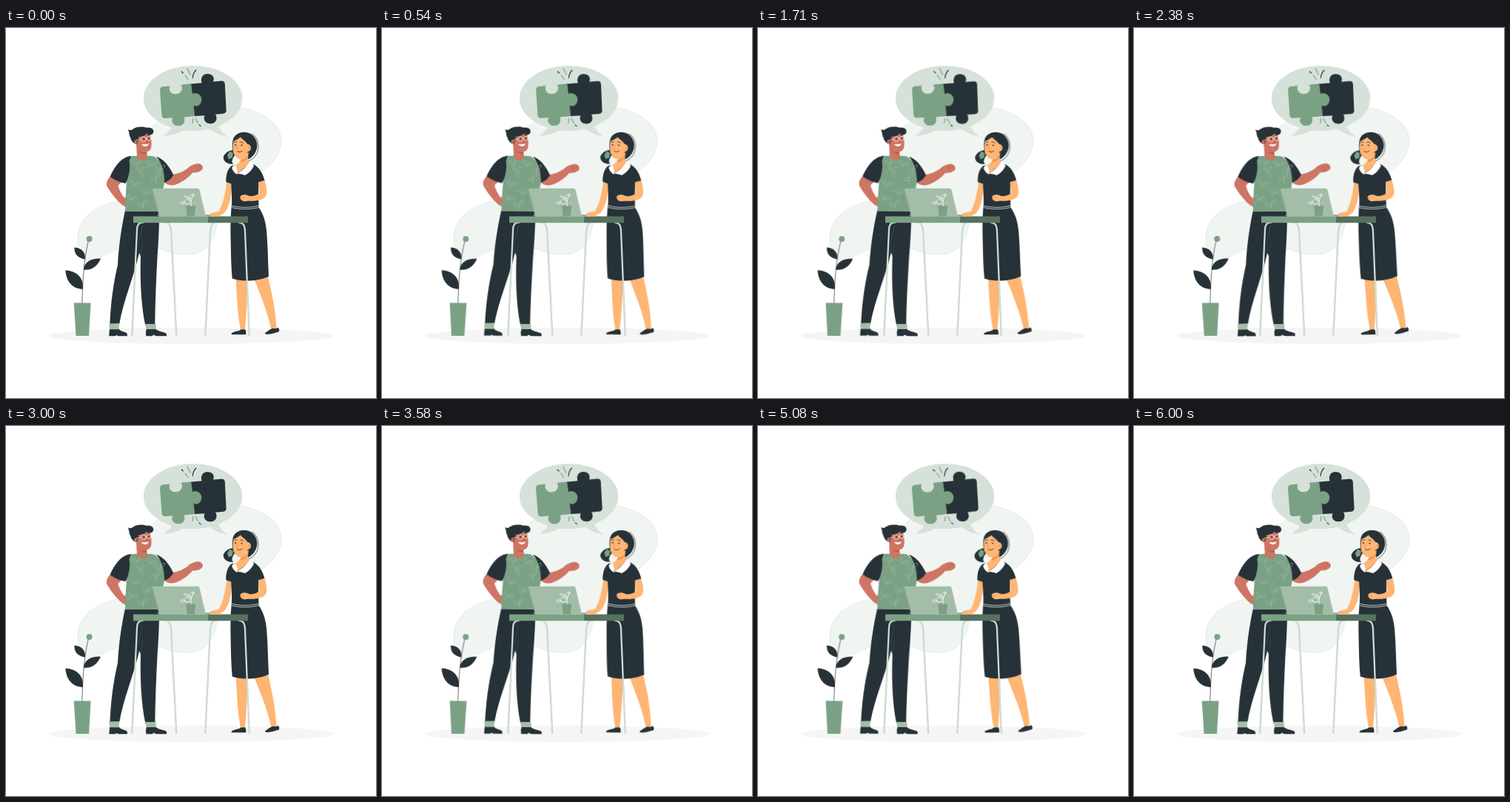
Recreate the animation shown at these times as an HTML page. Size 500 px wide and 500 px high, loop 6.04 s.

```html
<!DOCTYPE html>
<html lang="en">
<head>
<meta charset="utf-8">
<title>Team talk</title>
<style>
  html, body { margin: 0; width: 100%; height: 100%; overflow: hidden; background: #fff; }
  svg { display: block; width: 100vw; height: 100vh; }
  .ink { fill: #263238; }
  .green { fill: #7ba185; }
  .pale { fill: #a3bda9; }
  .man { fill: #ce7563; }
  .woman { fill: #ffb573; }
  .white { fill: #fff; }
  .line { fill: none; stroke-linecap: round; stroke-linejoin: round; }
  #puzzle { transform-origin: 252px 97px; }
  #plant { transform-origin: 104px 349px; }
  #he { transform-origin: 201px 275px; }
  #she { transform-origin: 322px 277px; }
</style>
</head>
<body>
<svg viewBox="0 0 500 500">
  <defs>
    <g id="sprig" class="line" stroke="#9dbaa5" stroke-width=".55">
      <path d="M0 11C1 7 2 4 5 0M2 6C-3 6-5 3-4 0C0 0 2 3 2 6ZM3 4C7 5 9 3 10 0C6-1 4 1 3 4Z"/>
    </g>
  </defs>

  <!-- backdrop -->
  <path fill="#f0f5f2" stroke="#ccd5cf" stroke-width=".4" d="M97 282C97 257 122 240 150 234C188 224 168 166 196 135C222 108 270 105 300 106C341 108 372 126 372 153C371 185 337 199 311 211C280 228 293 267 275 292C268 302 257 306 244 306C216 306 204 292 172 293C145 296 121 319 106 313C99 309 97 296 97 282Z"/>
  <ellipse cx="250" cy="416" rx="193" ry="11" fill="#f5f5f5"/>

  <!-- speech bubble -->
  <g fill="#d6e1d9">
    <ellipse cx="252.600" cy="95" rx="66.800" ry="44"/>
    <path d="M226 131C223 138 218 143 212 145.300C224 145.500 235 142 244 136Z"/>
    <path d="M274 135C281 141 290 145.500 300 147C293 143 288 137 286 129Z"/>
  </g>

  <g id="puzzle">
    <path class="ink" d="M250 75.500L264.500 74.300C262.500 67 266 62 272 62C279 62 282.500 67 280 72.500L291.500 71.500Q295.500 71.500 295.800 75.500L297.600 111Q297.800 115.300 293.500 115.800L283 116.800C286.500 122 284 129.300 276.500 129.300C269.500 129.300 266 124 268.500 118.200L255 119Z"/>
    <path class="green" d="M212 79.300L221.500 78.200C219 83 222 89.500 229.500 89.300C237 89 240 82 236.500 76.800L250 75.300L252 89C257 86 264.500 90 264.300 97C264 104 257.500 107.500 253.500 104.500L255 119L240.500 120.500C243 126 240 132.300 233 132.300C225.500 132.300 222.500 126 225.500 121.300L215 122Q211 122.300 210.500 118L208 84Q207.800 80 212 79.300Z"/>
    <path class="line" stroke="#4e6f59" stroke-width=".5" d="M250 75.500L252 89C257 86 264.500 90 264.300 97C264 104 257.500 107.500 253.500 104.500L255 119"/>
    <g class="line" stroke-width="1.200">
      <path stroke="#263238" d="M237.300 59L239.200 60.800M256.800 57C253.500 60 252.500 63 252.300 67.500M261.200 130.800L263 132.600"/>
      <path stroke="#7ba185" d="M242 64L246 69.500M245 55L249 63M253 122.500L252 128.500M256.300 122.500L259.500 128.500"/>
    </g>
  </g>

  <g id="plant">
    <path class="line" stroke="#263238" stroke-width=".7" d="M102.800 373C103.500 345 105 312 111.500 287"/>
    <circle class="green" cx="112.600" cy="285" r="4"/>
    <path class="ink" d="M106.800 312.500C97 311 92 305 92.500 296.500C102 297 108 303 106.800 312.500ZM104.800 326.500C106 316 115 311 128 311.500C124 322 115 328 104.800 326.500ZM104 352.800C90 352.500 81.500 343 80.300 327.500C95 328 105.500 337 104 352.800Z"/>
    <path class="green" d="M91.700 371.600H114.600L112 416H94.500Z"/>
  </g>

  <g id="he">
    <path class="ink" d="M140 406.500H152.500C155 411 163 410 163.800 413.500V416.300H152L149 415L148 416.300H139.200ZM190 406.500H202C206 411 216 410.500 217 413.500V416.300H203L199 414.500L198 416.300H189.300L188.800 411Z"/>
    <path class="ink" d="M161 246.500H207.300C207 270 206 290 204.500 310C203 340 201.500 372 201.300 402L188.300 402C182.500 375 181 340 182 308L180 304C173 336 158.500 368 153 401L140.300 401C141.500 372 145 345 151 320C152.500 293 156 270 161 246.500Z"/>
    <path class="line" stroke="#47545a" stroke-width=".5" d="M184 268C182 280 179 290 179.500 304M182 308L185 288"/>
    <path class="pale" d="M139.200 399.500L153.300 399L152.300 407.300H140ZM188 400H202.500L202.800 407H189.500Z"/>

    <path class="man" d="M143 198C138 203 134.500 209 136.500 214C143 225 152 236 159.500 240.800C166 242.300 172 240 170.800 234C168 229 163 229 160 229.500C155.500 224 152.500 217 151.500 213L158 206Z"/>
    <path class="man" d="M212 206C215 211 221 213.500 228 212C239 208 247 202 252 195.500C257 195.500 264.500 194.500 266 189.500C266.300 184 260.500 181.800 255 184C250 185.500 247 187.500 244.500 190.500C239 194 232 197.500 224 198Z"/>
    <path class="line" stroke="#a8543f" stroke-width=".6" d="M256 186L258 191M261 184.500L262 188"/>
    <path class="green" d="M166 174C173 172 190 172 200 173.500C208 178 214 188 214.500 206L212.500 217L206.800 248H161C161 235 162 222 163 208L165 190Z"/>
    <path class="ink" d="M169 173C156 174 146 188 140.800 201C147 206 154 208.500 161.500 210C166.500 202 168.500 187 166.500 180ZM203 173.800C212 176 221 187 226.300 198.500C223 204.500 218.500 207.500 214 209C214.500 196 211 183 203 173.800Z"/>
    <g id="print"></g>

    <path class="man" d="M176 156L177 173C180 181 190 181 191 173.500L189.500 165Z"/>
    <path fill="#b45e4a" d="M180 166C184 169 188 168.500 190 167.500L190.300 170C186 171.500 182 169 180 166Z"/>
    <path class="man" d="M176 147L194 142.500C196.500 148 197.300 157 196 162.500C193.500 169 186 168.500 180.500 165C176 161 175 154 176 147Z"/>
    <path class="ink" d="M164.800 137C167 139 170 138 172.500 136C178 133 185 133 190 134.800C196 133 201 137.500 199 141.500C198 145 193.500 145 190 143C187 146.500 182 147 179.500 147L178.800 154C176 151 174.500 153 176 157C172 156 169 152 168.500 149C167.500 147 166.500 145 166.500 142.500C166.300 141 165.500 139 164.800 137Z"/>
    <circle class="man" cx="176" cy="154" r="2.700"/>
    <path class="line" stroke="#263238" stroke-width=".9" d="M183 145.500L187.500 144.500M191.500 144.500L194.500 145M177 152.500V156"/>
    <g class="line" stroke="#fff" stroke-width=".6">
      <circle cx="185.700" cy="150.200" r="3.400"/><circle cx="193.200" cy="149.400" r="2.900"/>
      <path d="M182.300 150.500L176.500 151.300M189.100 149.700L190.300 149.500"/>
    </g>
    <circle class="ink" cx="186.500" cy="150" r="1.100"/><circle class="ink" cx="193" cy="149.300" r="1"/>
    <path class="line" stroke="#9b4a38" stroke-width=".6" d="M190.500 151.500L192.500 154.500L189.800 155"/>
    <path class="white" d="M182.800 156.800C186 157.800 190 157.300 192.800 156C192 160.800 185.500 161.800 182.800 156.800Z"/>
  </g>

  <g id="she">
    <path class="woman" d="M310.500 336H326.500C326.500 365 324.500 390 322.800 408H317C312.500 385 312 360 310.500 336ZM334 336L353 333C360 358 364 383 365.500 405L358.500 408C354 385 344 361 334 336Z"/>
    <path class="ink" d="M305 412.300C309 409.500 315 410 317 407.500L323 407.300C324.700 409.500 324.300 412 324.300 414.200L306 414.300C304.500 414 304.300 413 305 412.300ZM350 412C354 410 357 406.500 361 405.800C364 407 366 405.500 367.500 404.800C369.500 407 369.800 409 368.500 410.500C363 412 355 415 350.500 413.500Z"/>
    <path class="woman" d="M298.300 207L305 211C304.500 226 303 240 295 250C290 254.300 280 255.200 275.800 252.500C276 249 284 249.200 288 247.500C293.500 236 297 222 298.300 207Z"/>
    <path class="ink" d="M305.500 186C300 189 297.200 197 297.300 208L304.300 210.500C304.500 222 306 233 304.500 243C303 260 303.500 275 303.700 290C304 308 304.300 324 305.700 338.500C318 343.300 341 342.500 355 335.800C354 315 353.800 295 352.200 275C351 261 347.500 251 341.800 243C341 230 341 220 341.500 208.500L349.500 206C346.500 195 341.500 187 333 183.500Z"/>
    <path class="line" stroke="#fff" stroke-width=".7" d="M305.500 240.200C316 243.200 331 243.200 341.500 240M305 242.500C316 245.500 331 245.500 342 242.300"/>
    <path class="woman" d="M341 208.300L349.500 206C351.500 213 354 222 351 227.500C345 235 332 233.500 326.500 233.800C320.500 235.500 316 232.500 316.500 228C317.500 224.500 325 224.800 328.500 227C335 227.800 340 226 343 222C342 218 341 213 341 208.300Z"/>
    <path class="line" stroke="#d98a4f" stroke-width=".5" d="M318 229.500L322 229M343 222L341 219"/>

    <path class="ink" d="M306.500 152C308 143 318 139 327 141.500C337 144 341.500 156 338.500 164.500C336.500 171 331.500 176 325 178.500L308 172C306 166 305 160 306.500 152Z"/>
    <path class="line" stroke="#263238" stroke-width=".7" d="M333 143C342 149 343.500 164 337 173C334 177 330 179 327 180"/>
    <path class="ink" d="M307 165C301 165 296.500 168.500 293.800 174C293.500 179 297.500 184.500 307.500 183.800C303.500 181 306.500 176 309 172Z"/>
    <path class="woman" d="M318 173L328 168C326.500 175 327 179 329.500 183L312.500 197L309.500 186C313 184 318 181 318 173Z"/>
    <path fill="#e99551" d="M317.800 178C322 177.500 325 175 327.200 172L326.800 175C324 179 320 181.500 317 181Z"/>
    <path class="white" d="M310.500 185.500C307 185.500 305 188 305.500 190C306.500 193 309 196 312 198L312.800 193ZM329 181.500C332 181.500 334.500 184 335 186.500C332 192 328 196.500 323 199C319 197.500 315 196 312 197.500C318 193 325 188 329 181.500Z"/>
    <path class="woman" d="M307.500 153C312 151 315 149 317 147.500C320 151 324 153 326.500 157C328.500 157 331 158.500 331 162C331 165.500 328.500 167 326.500 167C326 173 322 178 317 177.500C311 176.500 307.500 171 306.800 166C306.300 161 306.500 156 307.500 153Z"/>
    <path class="green" d="M302.500 166.500L306.800 169L306 175L301 177.500L299 172Z"/>
    <path class="line" stroke="#263238" stroke-width=".8" d="M308.200 155C309 153.800 310.500 153.500 311.800 154M316.500 154.300C318 153.500 320 154 321 155.500M312.300 166.300C314.500 168.200 317.500 168 319.500 165.800"/>
    <circle class="ink" cx="310" cy="158" r="1"/><circle class="ink" cx="318.500" cy="158.500" r="1"/>
    <path class="line" stroke="#d98a4f" stroke-width=".6" d="M313 158.500L311.300 163L313.500 163.300M328.500 160C329.500 161.500 328.500 163 327.500 164"/>
  </g>

  <!-- table and what stands on it -->
  <path id="legs" class="line" style="stroke-linecap:butt" d="M186 262.500C179 263 177.300 266 177 273L170.300 416M216 262.500C222 264 223 270 223.300 278L230.300 416M282 262.500C277 264 276 270 275.800 278L269.300 416M314 262.500C321 263 322.700 267 323 275L328.800 416"/>
  <path class="green" d="M172 254.500H273V263.300H172Z"/>
  <path fill="#56715d" d="M273 254.500H327V263.300H273Z"/>
  <path fill="#8aa994" d="M204 252.300H276V254.600H206Z"/>
  <path class="pale" d="M199 216.800H259.500Q261 216.800 261.500 218.500L270 254.500H207L197.500 218.500Q197.200 216.800 199 216.800Z"/>
  <path class="line" stroke="#86a590" stroke-width=".7" d="M198 217.500L207.500 254.500"/>
  <path class="woman" d="M276 251C279 248.700 285 249 289 249.500L292 252C288 254.800 280 255.200 276.500 254.500Z"/>
  <path class="green" d="M243 240.300H256.200L254.600 254.500H244.600Z"/>
  <g class="line" stroke="#fff" stroke-width=".8">
    <path d="M250.500 240C250.500 235 249 232 246.500 229.500M250 235C250.500 230 252 228 254 224.500C250 224.500 247.500 227 248 230C250 231 253 229 254 224.500M249.500 236.500C246 239 241 238 241 234.500C241.500 231 247 230.500 249.500 234M241 235.500C239 234.500 237 235 236 236.500C238 238 241 238 242 237M246.500 229.500C243.500 230 241.500 228.500 240.800 227C243.500 226 246 227 246.500 229.500"/>
  </g>
</svg>
<script>
  const LOOP = 6040;
  const $ = id => document.getElementById(id);
  const NS = "http://www.w3.org/2000/svg";

  const copy = (id, parent, transform) => {
    const use = document.createElementNS(NS, "use");
    use.setAttribute("href", "#" + id);
    use.setAttribute("transform", transform);
    parent.append(use);
  };

  // shirt print: x, y, turn
  [[175, 179, -10], [195, 180, 20], [186, 192, 100], [173, 207, 15], [199, 201, -25],
   [189, 218, 5], [170, 226, 30], [205, 188, -15], [182, 236, -20]]
    .forEach(([x, y, turn]) => copy("sprig", $("print"), `translate(${x} ${y}) rotate(${turn})`));

  // table legs: tinted outside, pale core
  const core = $("legs").cloneNode();
  core.removeAttribute("id");
  $("legs").setAttribute("stroke", "#c0d1c7");
  $("legs").setAttribute("stroke-width", "2.3");
  core.setAttribute("stroke", "#e0e9e3");
  core.setAttribute("stroke-width", ".8");
  $("legs").after(core);

  // each part rocks one degree either way; turns per loop
  const sway = [
    { transform: "rotate(0deg)", offset: 0 },
    { transform: "rotate(1deg)", offset: 0.25 },
    { transform: "rotate(-1deg)", offset: 0.75 },
    { transform: "rotate(0deg)", offset: 1 }
  ];
  Object.entries({ puzzle: 1, she: 2, he: 4, plant: 4 }).forEach(([id, turns]) => {
    $(id).animate(sway, { duration: LOOP / turns, iterations: Infinity });
  });
</script>
</body>
</html>
```
